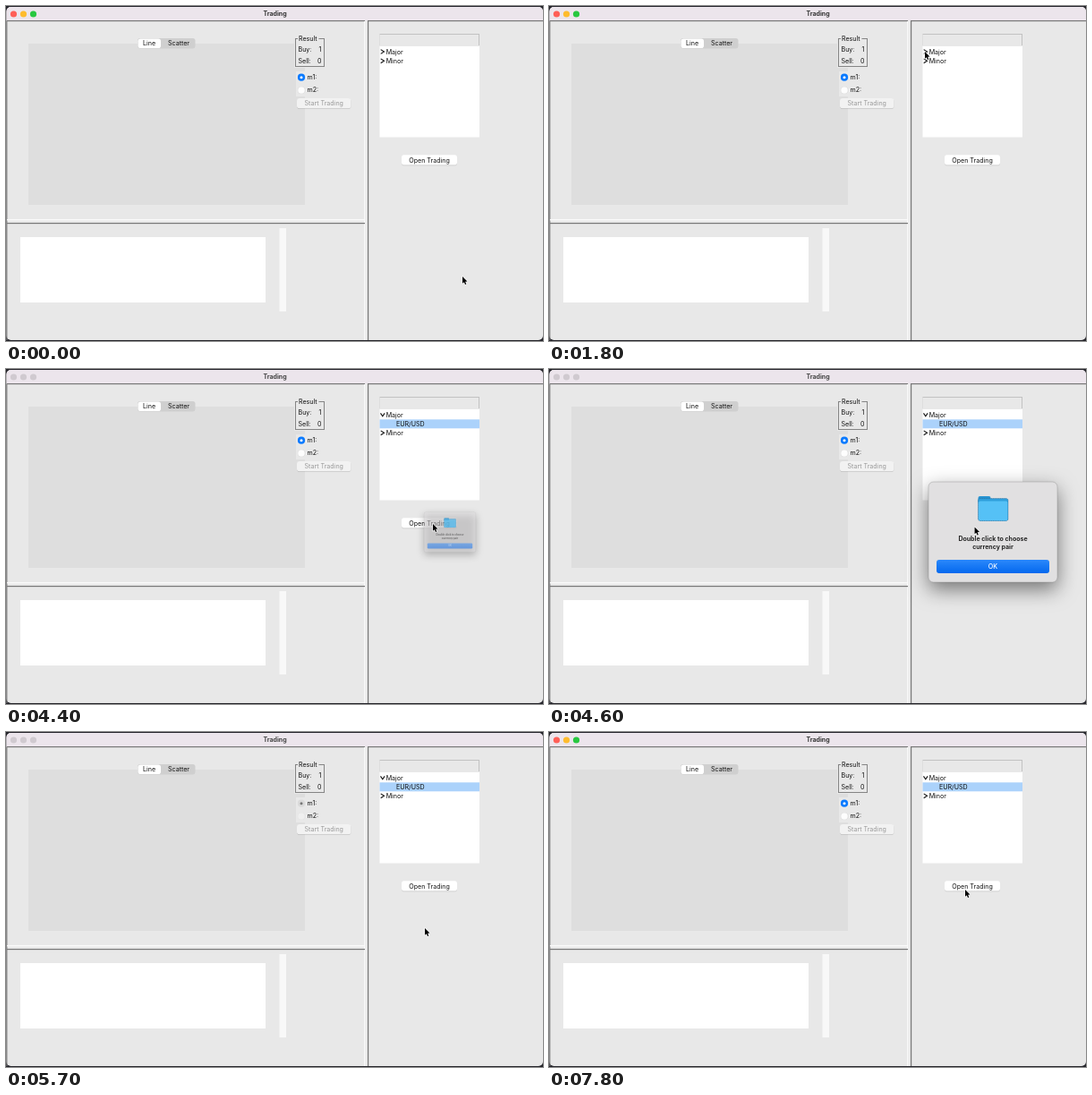
An HTML page with a canvas for the animation above (8000 ms loop, 600 by 374 pixels).

```html
<!DOCTYPE html>
<html lang="en">
<head>
<meta charset="utf-8">
<title>Trading</title>
<style>
html, body { margin: 0; width: 100%; height: 100%; overflow: hidden; background: #25252b; }
canvas { display: block; }
</style>
</head>
<body>
<canvas id="stage" width="600" height="374"></canvas>
<script>
const c = document.getElementById('stage').getContext('2d');
const LOOP = 8000, STEP = 100;
const FONT = 'Inter, "Liberation Sans", sans-serif';

// Cursor moves: start, end, from x, y, to x, y
const moves = [
  [100, 1350, 510, 302, 420, 51],
  [2000, 2500, 420, 51, 449, 62.5],
  [3300, 4000, 449, 62.5, 477, 173],
  [4500, 5000, 477, 173, 463, 207],
  [5000, 5300, 463, 207, 468, 219],
  [5700, 6300, 468, 219, 458, 67],
  [7200, 7700, 458, 67, 465, 176]
];
// Mouse button held down: from, to
const presses = [[1900, 2000], [2600, 2700], [3000, 3200], [4100, 4200],
  [5300, 5400], [6500, 6600], [6700, 6800]];

const clamp = v => Math.max(0, Math.min(1, v));
const ease = v => v * v * (3 - 2 * v);
const within = (t, [a, b]) => t >= a && t < b;

function rect(x, y, w, h, fill) {
  c.fillStyle = fill;
  c.fillRect(x, y, w, h);
}

function pill(x, y, w, h, r, fill) {
  c.beginPath();
  c.roundRect(x, y, w, h, r);
  c.fillStyle = fill;
  c.fill();
}

function dot(x, y, r, fill) {
  c.beginPath();
  c.arc(x, y, r, 0, Math.PI * 2);
  c.fillStyle = fill;
  c.fill();
}

function text(s, x, y, { align = 'left', color = '#111', weight = 400, size = 7.1 } = {}) {
  c.font = `${weight} ${size}px ${FONT}`;
  c.textAlign = align;
  c.fillStyle = color;
  c.fillText(s, x, y);
}

function button(s, x, y, w, h, fill, color) {
  pill(x, y + 0.6, w, h, 2.8, 'rgba(0,0,0,.16)');
  pill(x, y, w, h, 2.8, fill);
  text(s, x + w / 2, y + 8.4, { align: 'center', color });
}

function drawWindow(active) {
  rect(0, 0, 600, 374, '#25252b');
  pill(0.5, 1, 599.5, 372, 5, '#e8e8e8');
  pill(0.5, 1, 599.5, 15.5, [5, 5, 0, 0], '#ece5ec');
  ['#ff5f57', '#febc2e', '#28c840'].forEach((color, i) =>
    dot(8.5 + i * 11, 9, 3.6, active ? color : '#d0cad0'));
  text('Trading', 300.5, 11.2, { align: 'center', weight: 700, size: 7, color: active ? '#333' : '#444' });

  // Sunken panes and sashes
  rect(1, 16, 400, 1.2, '#777');
  rect(404, 16, 196, 1.2, '#777');
  rect(0.5, 17, 1, 356, '#8a8a8a');
  rect(400, 17, 1.5, 356, '#f8f8f8');
  rect(404, 17, 1.2, 356, '#777');
  rect(1, 238, 400, 1.4, '#fafafa');
  rect(1, 242, 400, 1.2, '#777');
}

function drawChartPane(enabled) {
  rect(25, 42, 309, 180, '#dedede');
  pill(147, 36, 64.5, 11.5, 3, '#cfcfcf');
  pill(147.5, 36.5, 25.5, 10.5, 2.8, '#fff');
  text('Line', 160, 44.2, { align: 'center' });
  text('Scatter', 193, 44.2, { align: 'center' });

  rect(322, 33, 35, 36, '#e8e8e8');
  c.lineWidth = 1;
  c.strokeStyle = '#858585';
  c.strokeRect(323.5, 36.5, 32, 31);
  rect(326, 33, 23.5, 7, '#e8e8e8');
  text('Result', 327, 38.6);
  text('Buy:', 326.5, 50.6);
  text('1', 352.5, 50.6, { align: 'right' });
  text('Sell:', 326.5, 64);
  text('0', 352.5, 64, { align: 'right' });

  rect(324, 73, 36, 28, '#e8e8e8');
  dot(330, 79.7, 4.1, enabled ? '#0a7aff' : '#dadada');
  dot(330, 79.7, 1.5, enabled ? '#fff' : '#777');
  text('m1:', 336.5, 82.2);
  dot(330, 94, 4.1, enabled ? '#d4d4d4' : '#dedede');
  dot(330, 94, 3.8, enabled ? '#fdfdfd' : '#efefef');
  text('m2:', 336.5, 96.4);
  button('Start Trading', 325, 103, 60.5, 11.3, '#f2f2f2', '#989898');
}

function drawLogPane() {
  rect(16, 258, 274, 73, '#fff');
  rect(305.5, 248, 7.5, 93, '#f8f8f8');
}

function chevron(x, y, open) {
  c.beginPath();
  if (open) {
    c.moveTo(x, y - 1.6);
    c.lineTo(x + 2.3, y + 1.7);
    c.lineTo(x + 4.6, y - 1.6);
  } else {
    c.moveTo(x + 0.2, y - 2.4);
    c.lineTo(x + 4, y);
    c.lineTo(x + 0.2, y + 2.4);
  }
  c.strokeStyle = '#111';
  c.lineWidth = 1.1;
  c.stroke();
}

function drawTree(open, selected) {
  rect(417.5, 31, 111.5, 13.5, '#c2c2c2');
  rect(417.5, 32, 110.5, 12, '#e8e8e8');
  rect(417.5, 44.5, 111.5, 102, '#fff');
  if (selected) rect(417.5, 56.3, 111.5, 10, '#abd2fb');
  chevron(418.5, 51, open);
  text('Major', 424.7, 53.7);
  if (open) text('EUR/USD', 436, 64);
  const y = open ? 71.3 : 61.3;
  chevron(418.5, y, false);
  text('Minor', 424.7, y + 2.7);
  button('Open Trading', 442, 166.3, 62, 11.3, '#fff', '#111');
}

function drawFolder() {
  pill(479.5, 142, 14, 8, 2, '#2693d1');
  pill(479.5, 144.5, 33.5, 25, 2.2, '#2e9fdc');
  pill(480, 147.5, 32.5, 22, 2, '#55c1f6');
  c.strokeStyle = '#27618a';
  c.lineWidth = 0.7;
  c.setLineDash([1, 1]);
  c.beginPath();
  c.roundRect(479.5, 144.5, 33.5, 25, 2.2);
  c.stroke();
  c.setLineDash([]);
}

function drawDialog(scale, alpha, pressed) {
  c.save();
  c.globalAlpha = alpha;
  c.translate(496, 182);
  c.scale(scale, scale);
  c.translate(-496, -182);
  c.shadowColor = 'rgba(0,0,0,.5)';
  c.shadowBlur = 22 * scale;
  c.shadowOffsetY = 8 * scale;
  pill(424, 126, 144, 112, 5.5, '#e1e0e1');
  c.shadowColor = 'transparent';
  c.strokeStyle = 'rgba(120,120,120,.55)';
  c.lineWidth = 0.6;
  c.stroke();
  drawFolder();
  const bold = { align: 'center', weight: 700, size: 7, color: '#262626' };
  text('Double click to choose', 496, 191.8, bold);
  text('currency pair', 496, 201.3, bold);
  const blue = c.createLinearGradient(0, 213, 0, 228);
  blue.addColorStop(0, pressed ? '#1268d8' : '#2a88fb');
  blue.addColorStop(1, pressed ? '#0454c0' : '#0468ee');
  pill(433, 213, 126, 15, 3, blue);
  text('OK', 496, 222.8, { align: 'center', color: '#fff', weight: 500 });
  c.restore();
}

function cursorAt(t) {
  let pos = [moves[0][2], moves[0][3]];
  for (const [a, b, x0, y0, x1, y1] of moves) {
    if (t < a) break;
    const k = ease(clamp((t - a) / (b - a)));
    pos = [x0 + (x1 - x0) * k, y0 + (y1 - y0) * k];
  }
  return pos;
}

function drawCursor(t) {
  const [x, y] = cursorAt(t);
  if (presses.some(p => within(t, p))) {
    c.beginPath();
    c.arc(x, y + 0.5, 12, 0, Math.PI * 2);
    c.strokeStyle = '#1b2530';
    c.lineWidth = 1.2;
    c.stroke();
  }
  c.save();
  c.translate(x, y);
  c.beginPath();
  c.moveTo(0, 0);
  for (const p of [[0, 7.8], [1.8, 6.2], [3, 9], [4.3, 8.4], [3.1, 5.7], [5.5, 5.5]]) c.lineTo(...p);
  c.closePath();
  c.lineJoin = 'round';
  c.lineWidth = 1.2;
  c.strokeStyle = 'rgba(255,255,255,.9)';
  c.stroke();
  c.fillStyle = '#000';
  c.fill();
  c.restore();
}

function dialogState(t) {
  if (t < 4400 || t >= 5700) return null;
  if (t >= 5500) return [1, 1 - (t - 5450) / 250];
  const k = clamp((t - 4400) / 200);
  const out = 1 - (1 - k) ** 3;
  return [0.4 + 0.6 * out, 0.5 + 0.5 * out];
}

function draw(t) {
  drawWindow(!within(t, [4400, 6500]));
  drawChartPane(!within(t, [5600, 6500]));
  drawLogPane();
  drawTree(t >= 2000, t >= 2600);
  const dialog = dialogState(t);
  if (dialog) drawDialog(...dialog, within(t, [5300, 5500]));
  drawCursor(t);
}

function tick() {
  const t = performance.now() % LOOP;
  draw(Math.floor(t / STEP) * STEP);
  requestAnimationFrame(tick);
}
tick();
</script>
</body>
</html>
```
